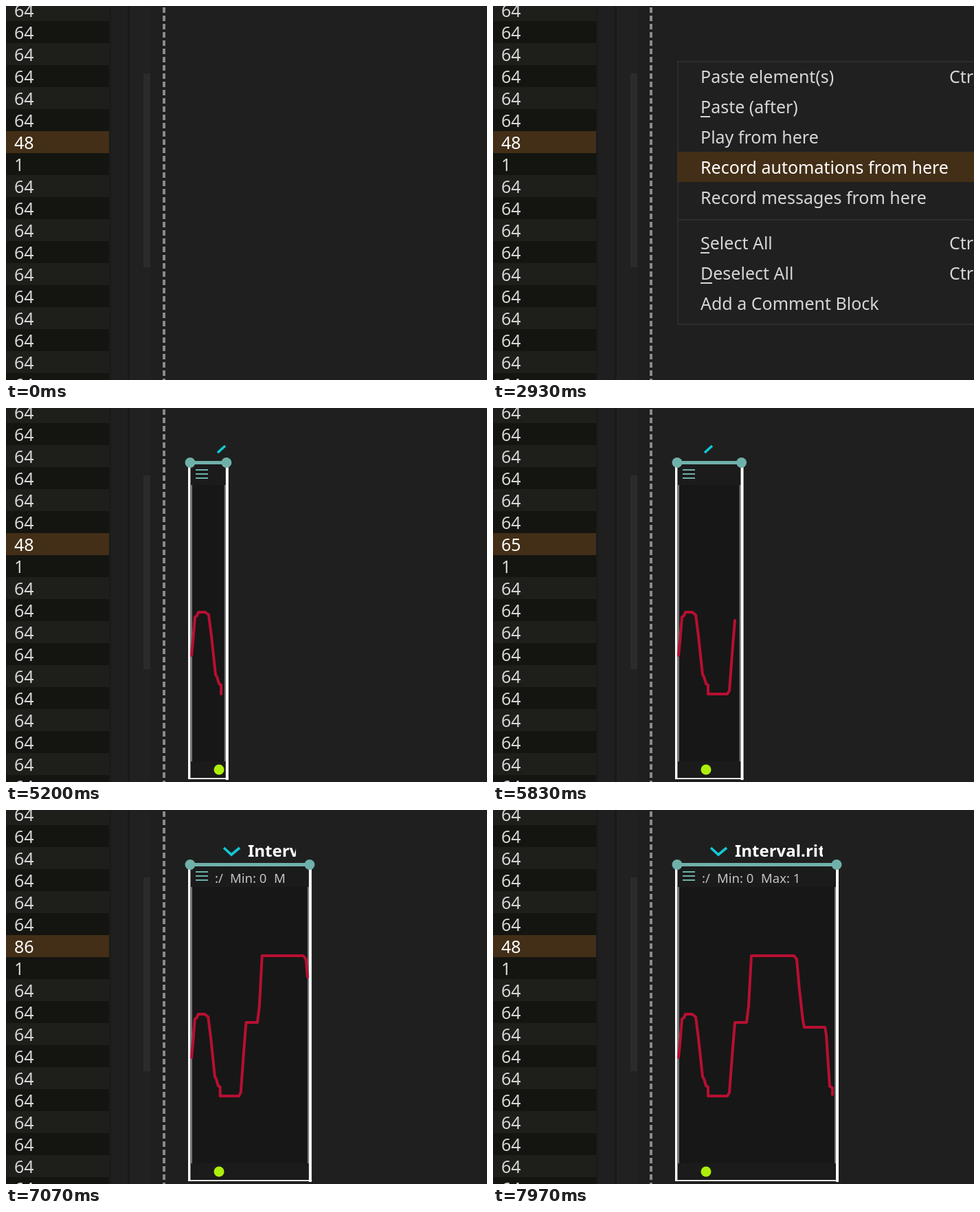
Write an HTML page that moves like this. It is 700x544 px and loops after 8000 ms.

```html
<!DOCTYPE html>
<html lang="en">
<head>
<meta charset="utf-8">
<title>Automation recording</title>
<style>
  html, body { margin: 0; width: 100%; height: 100%; overflow: hidden; background: #1f1f1f; }
  svg { display: block; width: 700px; height: 544px; }
  text { font: 25px "Noto Sans", "Open Sans", sans-serif; fill: #d6d6d6; white-space: pre; }
  .on { fill: #fff; }
  .small { font-size: 18.5px; fill: #c4c4c4; }
  .title { font-size: 24px; font-weight: 700; fill: #fff; }
  .line { fill: none; stroke-linecap: round; stroke-linejoin: round; }
</style>
</head>
<body>
<svg viewBox="0 0 700 544">
  <defs>
    <clipPath id="titleClip"><rect id="titleBox" x="310" y="40" height="34"/></clipPath>
    <clipPath id="rangeClip"><rect id="rangeBox" x="300" y="84" height="30"/></clipPath>
  </defs>
  <rect width="700" height="544" fill="#1f1f1f"/>
  <g id="rows"></g>
  <rect x="150" width="3" height="544" fill="#1b1b1b"/>
  <rect x="177" width="3" height="544" fill="#191919"/>
  <rect x="180" width="30" height="544" fill="#212121"/>
  <rect x="200" y="98" width="10" height="282" fill="#2b2b2b"/>
  <path d="M230 2V544" stroke="#8a8a8a" stroke-width="4" stroke-dasharray="8 4"/>

  <g id="menu">
    <rect x="269" y="81" width="440" height="382" fill="#202020" stroke="#2d2d2d" stroke-width="2"/>
    <path d="M269 311H700" stroke="#2d2d2d" stroke-width="2"/>
    <rect id="hover" x="268" width="432" height="44" fill="#432f17"/>
  </g>

  <g id="block">
    <rect class="body" x="267" y="82" height="457" fill="#1b1b1b"/>
    <rect class="body" x="267" y="112" height="402" fill="#171717"/>
    <path d="M270 112V514" stroke="#777" stroke-width="2"/>
    <path id="innerEdge" stroke="#777" stroke-width="2"/>
    <path id="floor" stroke="#e4e4e4" stroke-width="2"/>
    <path d="M266.7 82V540" stroke="#fff" stroke-width="3.4"/>
    <path id="edge" stroke="#fff" stroke-width="4"/>
    <path id="curve" class="line" stroke="#b80f32" stroke-width="4"/>
    <path id="bar" stroke="#6fb1aa" stroke-width="5"/>
    <circle cx="268" cy="79.5" r="7.5" fill="#6fb1aa"/>
    <circle id="grip" cy="79.5" r="7.5" fill="#6fb1aa"/>
    <path id="burger" d="M276 90H294M276 96H294M276 102H294" stroke="#6fb1aa" stroke-width="2"/>
    <circle id="dot" cx="310" cy="526" r="7.5" fill="#aeee0c"/>
    <path id="chevron" fill="none" stroke="#12c9d6" stroke-width="3.6"/>
    <g id="header">
      <g clip-path="url(#titleClip)"><text class="title" x="352" y="68">Interval.rita</text></g>
      <g clip-path="url(#rangeClip)">
        <text class="small" x="304" y="106">:/</text>
        <text class="small" x="326" y="106">Min: 0</text>
        <text class="small" x="390" y="106">Max: 1</text>
      </g>
    </g>
  </g>
</svg>
<script>
const LOOP = 8000, MENU_OPEN = 1970, MENU_CLOSE = 3660, RECORD = 4385, SPEED = 0.0647;
const LEFT = 268, START = 270;

// Time and hovered menu item.
const HOVER = [[2300, 0], [2420, 1], [2520, 2], [2620, 3]];

// Recorded values; a level stretch is only drawn once the value moves again.
const CURVE = [
  [270, 360], [272, 340], [275, 304], [278, 302], [280, 297], [290, 297], [295, 301],
  [299, 332], [305, 388], [307, 391], [310, 401], [313, 403], [313, 416], [341, 416],
  [344, 411], [349, 345], [352, 309], [369, 309], [372, 285], [376, 212], [438, 212],
  [442, 217], [446, 262], [451, 306], [453, 316], [483, 316], [485, 327], [490, 402],
  [494, 404], [494, 414]
];

const ITEMS = [
  ["Paste element(s)", 80, "Ctrl+"],
  ["Paste (after)", 124, "", 14],
  ["Play from here", 168],
  ["Record automations from here", 212],
  ["Record messages from here", 256],
  ["Select All", 322, "Ctrl+", 13],
  ["Deselect All", 366, "Ctrl+", 17],
  ["Add a Comment Block", 410]
];

const $ = id => document.getElementById(id);
const show = (el, on) => el.setAttribute("visibility", on ? "inherit" : "hidden");

function add(parent, tag, attrs, content = "") {
  const el = document.createElementNS("http://www.w3.org/2000/svg", tag);
  for (const k in attrs) el.setAttribute(k, attrs[k]);
  el.textContent = content;
  return parent.appendChild(el);
}

let counter;
for (let i = 0; i < 18; i++) {
  const y = 32 * i - 10, active = i === 6;
  const fill = active ? "#432f17" : i % 2 ? "#141510" : "#1e1f1b";
  add($("rows"), "rect", { y, width: 150, height: 32, fill });
  const label = add($("rows"), "text", { x: 12, y: y + 26 }, i === 7 ? "1" : "64");
  if (active) {
    label.setAttribute("class", "on");
    counter = label;
  }
}

const labels = ITEMS.map(([name, y, key, underline]) => {
  const label = add($("menu"), "text", { x: 302, y: y + 32 }, name);
  if (key) add($("menu"), "text", { x: 664, y: y + 32 }, key);
  if (underline) add($("menu"), "rect", { x: 302, y: y + 36, width: underline, height: 2, fill: "#d6d6d6" });
  return label;
});

function trace(pen) {
  const pts = [CURVE[0]];
  let level = CURVE[0][1];
  for (let i = 1; i < CURVE.length; i++) {
    const [x0, y0] = CURVE[i - 1], [x1, y1] = CURVE[i];
    if (x1 > pen) {
      if (pen > x0 && y0 !== y1) {
        level = y0 + (y1 - y0) * (pen - x0) / (x1 - x0);
        pts.push([pen, level]);
      }
      break;
    }
    pts.push([x1, y1]);
    level = y1;
  }
  // Drop the trailing level stretch.
  while (pts.length > 1 && pts.at(-1)[1] === pts.at(-2)[1]) pts.pop();
  return { pts, level };
}

function drawMenu(t) {
  const open = t >= MENU_OPEN && t < MENU_CLOSE;
  show($("menu"), open);
  let item = -1;
  for (const [at, i] of HOVER) if (t >= at) item = i;
  show($("hover"), open && item >= 0);
  if (item >= 0) $("hover").setAttribute("y", ITEMS[item][1]);
  labels.forEach((l, i) => l.setAttribute("class", i === item ? "on" : ""));
}

function drawBlock(t) {
  show($("block"), t >= MENU_CLOSE);
  const w = Math.max(0, (t - RECORD) * SPEED), right = LEFT + w;
  const path = (id, d) => $(id).setAttribute("d", d);

  document.querySelectorAll(".body").forEach(r => r.setAttribute("width", w + 1));
  path("innerEdge", `M${right - 2} 112V514`);
  path("edge", `M${right + 1} 82V541`);
  path("floor", `M265 539H${right + 3}`);
  path("bar", `M${LEFT} 79.5H${right}`);
  $("grip").setAttribute("cx", right);

  const { pts, level } = trace(right + 2.5);
  const end = pts.at(-1)[0];
  const k = Math.min(1, Math.max(0, right - 3 - START) / Math.max(0.01, end - START));
  path("curve", "M" + pts.map(([x, y]) => `${START + (x - START) * k} ${y}`).join("L"));
  show($("curve"), t >= MENU_CLOSE && w > 2);
  counter.textContent = w > 0 && level < 360 ? Math.round((516 - level) / 3.181) : 48;

  const full = w > 98;
  path("chevron", full ? "M317 55L328 65L340 55" : w < 50 ? "M297 55L308 65" : "M308 65L319 55");
  show($("burger"), t >= MENU_CLOSE && w > 34);
  show($("dot"), t >= MENU_CLOSE && w > 50);
  show($("header"), t >= MENU_CLOSE && full);
  $("titleBox").setAttribute("width", Math.max(0, right - 20 - 310));
  $("rangeBox").setAttribute("width", Math.max(0, right - 35 - 300));
}

function frame(now) {
  const t = now % LOOP;
  drawMenu(t);
  drawBlock(t);
  requestAnimationFrame(frame);
}
frame(performance.now());
</script>
</body>
</html>
```
